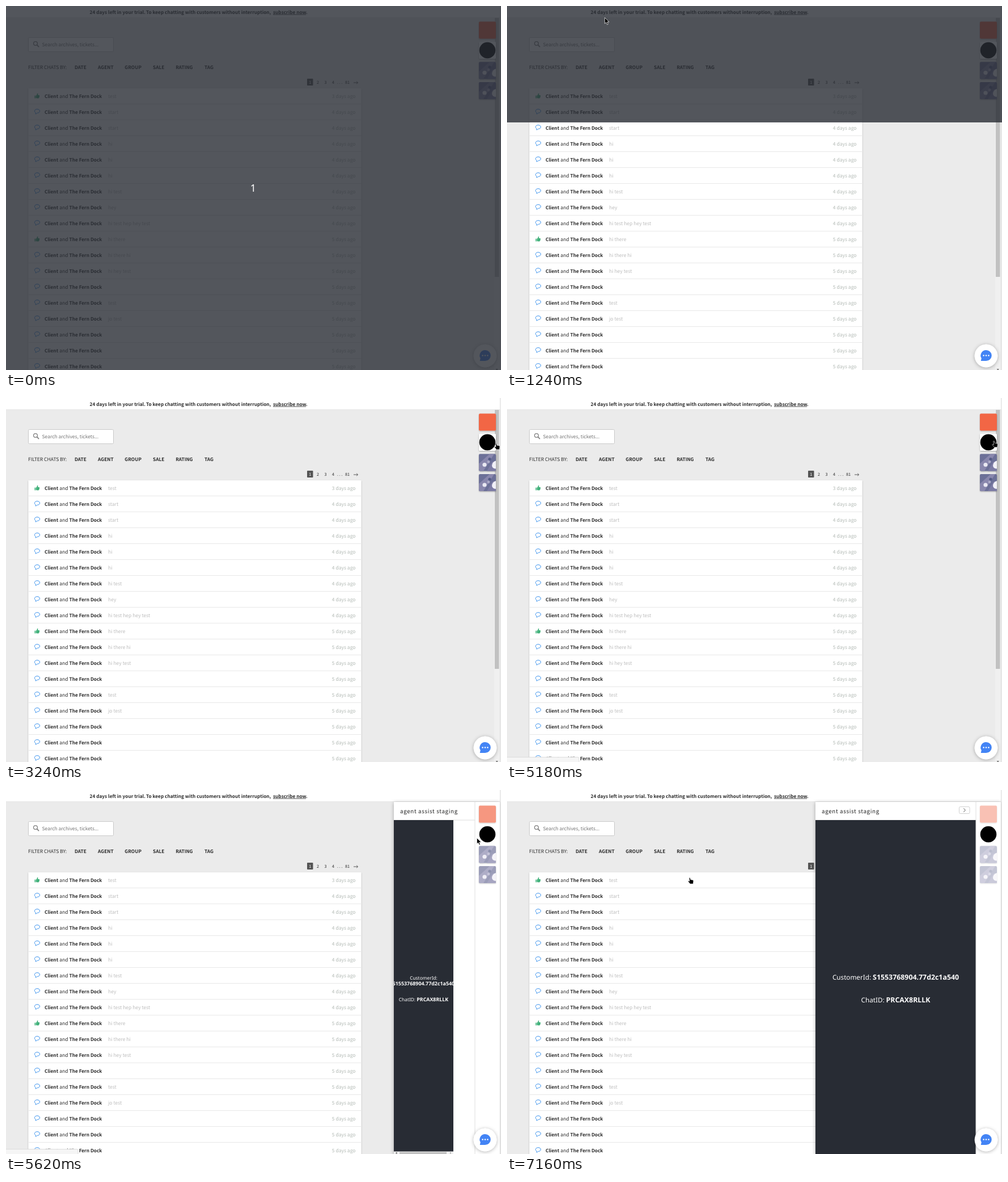
Recreate the animation shown at these times as an HTML page. Size 873x641 px, loop 8000 ms.

```html
<!DOCTYPE html>
<html lang="en">
<head>
<meta charset="utf-8">
<title>Chat archives</title>
<style>
html, body { margin: 0; width: 100%; height: 100%; overflow: hidden; background: #ebebeb; }
#stage { display: block; width: 873px; height: 641px; }
text {
  font: 8.52px "Noto Sans CJK JP", "Noto Sans CJK SC", "Noto Sans CJK", "Noto Sans CJK KR", "Noto Sans CJK TC", sans-serif;
  fill: #2b2b2b;
  text-rendering: geometricPrecision;
}
.b { font-weight: 700; font-size: 8.27px; }
.dim { fill: #bdbdbd; }
.ago { fill: #b3bab5; text-anchor: end; }
.hint { fill: #757575; }
.page { font-size: 7.3px; text-anchor: middle; }
.title { font-size: 9.8px; letter-spacing: .65px; fill: #222; }
.info text { font-family: "Noto Sans", "Open Sans", sans-serif; font-size: 11.7px; fill: #fff; text-anchor: middle; }
.info tspan { font-weight: 700; font-size: 12.35px; }
.info .s { font-size: 8.35px; }
.info .s tspan, .info .sb { font-weight: 700; font-size: 8.9px; }
#count { font: 18px "Noto Sans", "Open Sans", sans-serif; fill: #fff; text-anchor: middle; }
</style>
</head>
<body>
<svg id="stage" viewBox="0 0 873 641" xmlns="http://www.w3.org/2000/svg">
  <defs>
    <filter id="soft" x="-30%" y="-30%" width="160%" height="160%">
      <feDropShadow dx="0" dy="1" stdDeviation="1.3" flood-opacity=".3"/>
    </filter>
    <filter id="wide" x="-30%" y="-30%" width="160%" height="160%">
      <feDropShadow dx="0" dy="1" stdDeviation="3" flood-opacity=".3"/>
    </filter>
    <g id="bubble" fill="none" stroke="#3b93ee" stroke-linejoin="round">
      <path d="M2.6 7.1 C-1.1 5.3 .1 .7 5 .7 C11 .7 11.1 7.3 5.2 7.4 C4.6 8.5 3 9 1.7 9 Q2.7 8.3 2.6 7.1Z"/>
    </g>
    <g id="thumb" fill="#43b27c">
      <path d="M.5 4.2H2.4V9H.5Z M3 4.4 L4.6 2.4 L5 .2 Q6.8 .2 6.5 2.3 L6.2 3.5 H8.5 Q9.6 3.8 9 5 Q9.4 5.8 8.8 6.4 Q9 7.3 8.3 7.7 Q8.3 9 7 9 H4.5 L3 8.4Z"/>
    </g>
    <g id="scene">
      <rect width="30" height="30" rx="2" fill="#6c7098"/>
      <path d="M0 17 L19 0 H27 L8 30 H2 L0 27Z" fill="#8987ad"/>
      <path d="M14 30 L24 13 L30 17 V30Z" fill="#7d7ba5"/>
      <circle cx="19" cy="9" r="2.6" fill="#555b86"/>
      <circle cx="10" cy="19" r="3.6" fill="#e9e8f2"/>
      <circle cx="17" cy="14" r="2.4" fill="#aaa8c6"/>
      <path d="M30 12 Q23 14 23 21 Q24 26 30 26Z" fill="#f1f0f7"/>
    </g>
  </defs>

  <rect width="873" height="641" fill="#ebebeb"/>
  <rect width="873" height="20.5" fill="#fff"/>
  <path d="M0 20.5H871" stroke="#dedede" stroke-width=".7"/>
  <text class="b" x="147.5" y="13.7">24 days left in your trial.</text>
  <text class="b" x="247" y="13.7">To keep chatting with customers without interruption,</text>
  <text class="b" x="471" y="13.7"><tspan text-decoration="underline">subscribe now</tspan>.</text>

  <rect x="39.5" y="55.5" width="150" height="25" rx="2" fill="#fff" stroke="#c9c9c9"/>
  <g fill="none" stroke="#808080" stroke-linecap="round">
    <circle cx="52" cy="66" r="3.4" stroke-width="1.3"/>
    <path d="M54.7 68.7L57.6 71.6" stroke-width="1.7"/>
  </g>
  <text class="hint" x="63.5" y="71">Search archives, tickets...</text>
  <g id="filters"></g>

  <rect x="531" y="128" width="10.5" height="12" rx="1" fill="#555"/>
  <g id="pages"></g>
  <path d="M613 135H620.5M618.2 132.8L620.5 135L618.2 137.2" fill="none" stroke="#333" stroke-width=".8"/>

  <rect x="39.5" y="145" width="587" height="510" fill="#fff" filter="url(#soft)"/>
  <g id="rows"></g>

  <path id="status" d="M-1 632.5H125Q127 632.5 127 634.5V642H-1Z" fill="#f5f5f5" stroke="#d6d6d6" stroke-width=".8"/>

  <rect x="861" y="21" width="10" height="620" fill="#f0f0f0"/>
  <rect x="862" y="21" width="7.5" height="456" fill="#c1c1c1"/>
  <path d="M863.5 639.3H868L865.8 641Z" fill="#444"/>

  <g id="panel">
    <rect id="sheet" y="21" height="622" fill="#fff" filter="url(#wide)"/>
    <path id="rule" stroke="#dcdcdc"/>
    <text id="title" class="title" y="41">agent assist staging</text>
    <svg id="frame" y="53" height="588" class="info">
      <rect width="300" height="588" fill="#282c34"/>
      <g id="large" transform="translate(141.5)">
        <text y="281.2">CustomerId: <tspan>S1553768904.77d2c1a540</tspan></text>
        <text y="321">ChatID: <tspan>PRCAX8RLLK</tspan></text>
      </g>
      <g id="small" transform="translate(52.5)">
        <text class="s" y="281.3">CustomerId:</text>
        <text class="sb" y="291.3" style="font-size:8.9px">S1553768904.77d2c1a540</text>
        <text class="s" y="319">ChatID: <tspan>PRCAX8RLLK</tspan></text>
        <rect x="-53" y="583.5" width="106" height="5" fill="#f1f1f1"/>
        <rect x="-42.5" y="584.5" width="83" height="4" fill="#c1c1c1"/>
        <path d="M-47 584.5V588L-49.5 586.3Z" fill="#555"/>
        <path d="M46.5 584.5V588L49 586.3Z" fill="#aaa"/>
      </g>
    </svg>
    <g id="fold" fill="none">
      <rect x="797.5" y="29.5" width="18.5" height="12" rx="2" fill="#fff" stroke="#cfcfcf"/>
      <path d="M805.3 32.3L808.4 35.5L805.3 38.7" stroke="#555"/>
    </g>
    <rect x="827" y="21" width="44" height="620" fill="#fff"/>
    <path d="M827 21V641" stroke="#dedede"/>
  </g>
  <path d="M871.8 0V641" stroke="#d4d4d4" stroke-width="1"/>
  <path d="M872.7 0V641" stroke="#f6f6f6" stroke-width=".8"/>

  <g class="tile" filter="url(#soft)"><rect x="834" y="27.5" width="30" height="30" rx="2" fill="#f26645"/></g>
  <rect id="plain" x="834" y="63" width="30" height="30" rx="2" fill="#fff" filter="url(#soft)"/>
  <circle cx="849" cy="78" r="14.3" fill="#000"/>
  <g class="tile" filter="url(#soft)"><use href="#scene" x="834" y="98.5"/></g>
  <g class="tile" filter="url(#soft)"><use href="#scene" x="834" y="134"/></g>

  <circle cx="845" cy="616" r="20.3" fill="#fff" filter="url(#wide)"/>
  <path d="M845 606A9.8 9.5 0 1 1 845 625H836.2Q835.6 625 835.8 624.2L836.8 620.5A9.8 9.5 0 0 1 845 606Z" fill="#4384f5"/>
  <g fill="#fff"><circle cx="840.6" cy="615.6" r="1.25"/><circle cx="845" cy="615.6" r="1.25"/><circle cx="849.4" cy="615.6" r="1.25"/></g>

  <g id="cover">
    <rect width="873" height="641" fill="#282c34" opacity=".8"/>
    <text id="count" x="436" y="327">1</text>
  </g>

  <g id="arrow" fill="#000" stroke="#fff" stroke-width=".7" stroke-linejoin="round">
    <path d="M.4 .4V11L2.8 8.8L4.6 12.8L6.4 12L4.7 8.1H8.1Z"/>
  </g>
  <g id="hand" fill="#000" stroke="#fff" stroke-width=".6" stroke-linejoin="round">
    <path d="M2.2 1.3Q3 .1 4 1.2L4.7 4.2L8.6 5Q10 5.3 9.9 6.8L9.3 11.8H3.6L2.8 10.2L.4 7.6Q.2 6.3 1.6 6.5L3 7.3Z"/>
  </g>
</svg>
<script>
const $ = id => document.getElementById(id);
const text = (x, y, str, cls = '') => `<text class="${cls}" x="${x}" y="${y}">${str}</text>`;

// Static lists
const filters = [[121, 'DATE'], [162, 'AGENT'], [209.3, 'GROUP'], [259, 'SALE'], [299.3, 'RATING'], [350, 'TAG']];
$('filters').innerHTML = text(39, 111.2, 'FILTER CHATS BY:') +
  filters.map(([x, s]) => text(x, 111.2, s, 'b')).join('');

const pages = [[550, '2'], [563.5, '3'], [577, '4'], [588.8, '. . .'], [602, '81']];
$('pages').innerHTML = '<g style="--c:#fff"><text class="page" x="536.3" y="137.4" style="fill:#fff">1</text></g>' +
  pages.map(([x, s]) => text(x, 137.4, s, 'page')).join('');

const notes = ['test', 'start', 'start', 'hi', 'hi', 'hi', 'hi test', 'hey', 'hi test hep hey test',
  'hi there', 'hi there hi', 'hi hey test', '', 'test', 'jo test', '', '', ''];
$('rows').innerHTML = notes.map((note, i) => {
  const y = 145 + 28 * i, base = y + 16.8;
  const days = i === 0 ? 3 : i < 9 ? 4 : 5;
  const icon = i % 9 ? 'bubble' : 'thumb';
  return `<path d="M40 ${y + 27.5}H626" stroke="#e8e8e8"/>` +
    `<use href="#${icon}" x="50" y="${y + (i % 9 ? 36 - 28 : 8.5)}"/>` +
    text(68, base, 'Client', 'b') + text(94.3, base, 'and') + text(111.5, base, 'The Fern Dock', 'b') +
    text(180, base, note, 'dim') + text(616.5, base, days + ' days ago', 'ago');
}).join('');

// Steps: [time, ...values]
const LOOP = 8000;
const cover = [[0, 641], [1100, 600], [1140, 510], [1200, 320], [1240, 205], [1260, 150], [1320, 20], [1380, 0]];
const status = [[0, 0], [3900, 1], [4080, 0], [5180, 1], [6700, 0], [6980, 1], [7160, 0]];
// left edge, inner frame width, icon opacity
const panel = [[0, 0, 0, 1], [5440, 783, 0, .9], [5620, 684, 105, .68], [5880, 544, 283, .4]];
const cursor = [
  [0, 0, 0, ''], [1240, 172, 20, 'arrow'], [1260, 203, 27, 'arrow'], [1320, 300, 46, 'arrow'],
  [1380, 374, 58, 'arrow'], [3240, 861, 79, 'hand'], [3480, 855.5, 75, 'hand'],
  [5620, 830, 84, 'arrow'], [5880, 712, 103, 'arrow'], [6160, 490, 127, 'arrow'],
  [6420, 418, 141, 'hand'], [6700, 362, 149.5, 'hand'], [6980, 328.5, 153.5, 'hand'], [7160, 319, 153.5, 'hand']
];
const at = (steps, t) => steps.filter(s => s[0] <= t).pop().slice(1);
const show = (id, on) => $(id).setAttribute('visibility', on ? 'inherit' : 'hidden');
const tiles = document.querySelectorAll('.tile');

function draw(t) {
  const [edge] = at(cover, t);
  $('cover').setAttribute('transform', `translate(0 ${edge - 641})`);
  show('cover', edge > 0);
  show('status', at(status, t)[0]);

  const [left, width, alpha] = at(panel, t);
  show('panel', left);
  show('plain', !left);
  if (left) {
    $('sheet').setAttribute('x', left);
    $('sheet').setAttribute('width', 871 - left);
    $('rule').setAttribute('d', `M${left} 53H827`);
    $('title').setAttribute('x', left + 11);
    $('frame').setAttribute('x', left);
    $('frame').setAttribute('width', width);
  }
  show('frame', width);
  show('small', width < 200);
  show('large', width > 200);
  show('fold', width > 200);
  tiles.forEach(tile => tile.setAttribute('opacity', alpha));

  const [x, y, kind] = at(cursor, t);
  for (const id of ['arrow', 'hand']) {
    show(id, id === kind);
    $(id).setAttribute('transform', `translate(${x} ${y})`);
  }
}

const start = performance.now();
function tick() {
  draw((performance.now() - start) % LOOP);
  requestAnimationFrame(tick);
}
tick();
</script>
</body>
</html>
```
